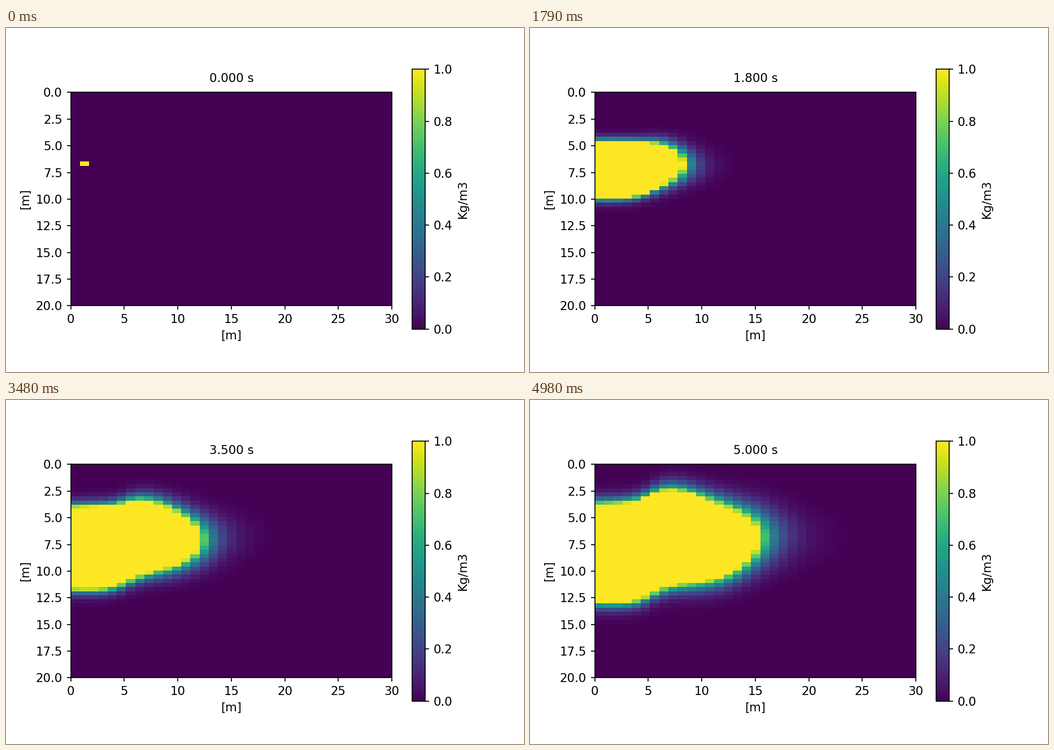
A matplotlib script for the animation above (5.03 s loop, 917 by 611 pixels).

```python
import numpy as np
import matplotlib.pyplot as plt
from matplotlib.animation import FuncAnimation

WIDTH, HEIGHT, DPI = 917, 611, 152.75
LOOP_MS, SLOTS = 5030, 202
ROWS, COLS = 52, 35
SRC_ROW, SRC_COL = 17, 1
DX, DY = 30 / COLS, 20 / ROWS

plt.rcParams.update({"font.family": "DejaVu Sans", "font.size": 10})

col = np.arange(COLS)[None, :]
y = (np.arange(ROWS)[:, None] + 0.5) * DY
inlet = 1 / (1 + np.exp((col - 5.6) / 0.9))
outer = np.exp(-((col - 13.5) / 3) ** 2 / 2)


def plume(t):
    """Concentration at time t: a drifting Gaussian around a fed core."""
    core = 4.5 * t - 1.2 + 1.2 * np.exp(-4 * t)
    bend = 0.118
    d = col - (SRC_COL + 0.116 * t * t)
    d = np.where(d < 0, -0.6 * d, d)
    # parabolic body, with a straight exponential tail ahead of the tip
    tip = max(np.sqrt(max(core, 0) / bend), 4)
    drop = bend * np.where(d < tip, d * d, 2 * tip * d - tip * tip)
    center = (SRC_ROW + 0.5) * DY + t * (0.33 * inlet + 0.1 * outer)
    spread = t * (0.6 - 0.12 * inlet) + 1e-3
    power = (core - drop - (y - center) ** 2) / (2 * spread)
    return np.exp(np.clip(power, -40, 1))


def step_at(ms):
    """Simulation step on show; two steps of the loop are 10 ms shorter."""
    ms += 10 * (ms >= 1040) + 10 * (ms >= 3030)
    return min(int(ms // 50), 100)


fig = plt.figure(figsize=((WIDTH + 0.01) / DPI, HEIGHT / DPI), dpi=DPI,
                 facecolor="white")
fig.subplots_adjust(left=0.125, right=0.9, bottom=0.125, top=0.88)
ax = fig.add_subplot()
image = ax.imshow(plume(0), cmap="viridis", vmin=0, vmax=1,
                  extent=(0, 30, 20, 0), interpolation="nearest")
ax.set_xlabel("[m]")
ax.set_ylabel("[m]")
fig.colorbar(image, ax=ax, label="Kg/m3")
clock = ax.text(0.5, 1.05, "0.000 s", transform=ax.transAxes, ha="center")


def update(i):
    t = 0.05 * step_at((i + 1) * LOOP_MS / SLOTS)
    image.set_data(plume(t))
    clock.set_text(f"{t:.3f} s")
    return image, clock


anim = FuncAnimation(fig, update, frames=SLOTS, interval=LOOP_MS / SLOTS,
                     repeat=True, repeat_delay=0, blit=False)
plt.show()
```
